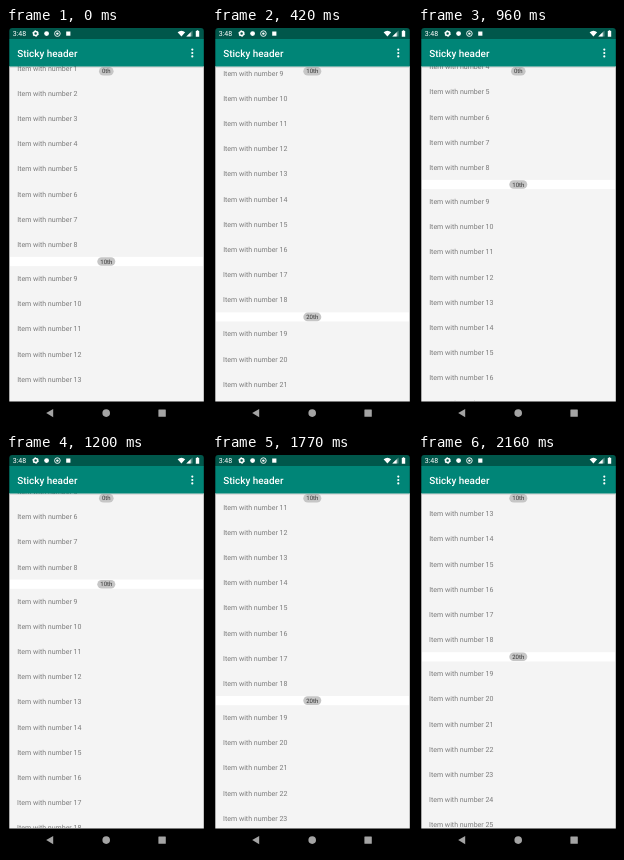
Recreate the animation shown at these times as an HTML page. Size 200x399 px, loop 3.39 s.

```html
<!DOCTYPE html>
<html lang="en">
<head>
<meta charset="utf-8">
<title>Sticky header</title>
<style>
  html, body { margin: 0; width: 100%; height: 100%; overflow: hidden; background: #000; }
  svg { display: block; width: 100vw; height: 100vh; }
  /* The tiny turn lets glyphs sit between whole pixels. */
  text { font-family: Roboto, sans-serif; text-rendering: geometricPrecision; transform: rotate(.02deg); }
  .item { font-size: 7.03px; fill: #7b7b7b; }
  .pill rect { fill: #c6c6c6; }
  .pill text { font-size: 6px; fill: #333; text-anchor: middle; }
</style>
</head>
<body>
<svg viewBox="0 0 200 399">
  <defs>
    <clipPath id="view"><rect x="3" y="38" width="195" height="335.5"/></clipPath>
    <linearGradient id="shade" x2="0" y2="1">
      <stop offset="0" stop-opacity=".18"/>
      <stop offset="1" stop-opacity="0"/>
    </linearGradient>
  </defs>
  <rect width="200" height="399"/>
  <rect x="3.3" y="38" width="194.5" height="335.5" fill="#f4f4f4"/>
  <g clip-path="url(#view)">
    <g id="list"></g>
    <g id="sticky"></g>
    <rect x="4" y="38.5" width="193" height="2" fill="url(#shade)"/>
  </g>

  <path d="M3.3 11.2V3Q3.3 0 6.3 0H194.8Q197.8 0 197.8 3V11.2Z" fill="#00574b"/>
  <rect x="3.3" y="11" width="194.5" height="27.5" fill="#008577"/>
  <text x="11.2" y="28.5" font-size="9.95" font-weight="500" fill="#fff">Sticky header</text>
  <g fill="#fff">
    <circle cx="186.3" cy="21.6" r="1.1"/>
    <circle cx="186.3" cy="25" r="1.1"/>
    <circle cx="186.3" cy="28.4" r="1.1"/>
    <text x="6.7" y="8" font-size="7">3:48</text>
    <circle cx="29.6" cy="5.6" r="2" fill="none" stroke="#fff" stroke-width="1.5"/>
    <circle cx="29.6" cy="5.6" r="2.9" fill="none" stroke="#fff" stroke-width=".8" stroke-dasharray="1.5 1.537"/>
    <circle cx="40.6" cy="5.6" r="2.4"/>
    <circle cx="51.4" cy="5.6" r="2.8" fill="none" stroke="#fff" stroke-width=".9"/>
    <circle cx="51.4" cy="5.6" r="1.2"/>
    <rect x="60.2" y="3.5" width="4.2" height="4.2"/>
    <path d="M171.6 4.2Q175.4 1.2 179.2 4.2L175.4 8.6Z"/>
    <path d="M186.5 2.4V8.6H180.3Z" fill-opacity=".35"/>
    <path d="M184.7 4.2V8.6H180.3Z"/>
    <path d="M189.8 3H190.7V2.3H192.3V3H193.2V8.8H189.8Z"/>
  </g>
  <g fill="#a4a4a4">
    <path d="M40.2 385.1L47.2 381V389.2Z"/>
    <circle cx="100.2" cy="385.1" r="3.8"/>
    <rect x="152.4" y="381.4" width="7.4" height="7.4" rx=".5"/>
  </g>
</svg>
<script>
const LOOP = 3390, STEP = 30;
const ROW = 25.2, HEAD = 8.8, GROUP = 10 * ROW + HEAD;
const TOP = 43.2;

// [time, y of item 9, ease-out power of the move that ends here]
const KEYS = [
  [0, 250.5, 1], [600, 13.8, 1.68], [630, 13.8, 1],
  [1050, 181.2, 2], [1080, 181.2, 1], [1530, 84, 1.44],
  [1650, 84, 1], [1770, 1.8, 1], [2160, -42, 2.2]
];

const list = document.getElementById('list');
const sticky = document.getElementById('sticky');

function add(parent, tag, attrs, label) {
  const el = document.createElementNS('http://www.w3.org/2000/svg', tag);
  for (const key in attrs) el.setAttribute(key, attrs[key]);
  if (label) el.textContent = label;
  parent.append(el);
  return el;
}

function pill(parent, k, y) {
  const w = k ? 18 : 14.6;
  const g = add(parent, 'g', { class: 'pill' });
  add(g, 'rect', { x: 100.3 - w / 2, y: y - 4.3, width: w, height: 8.6, rx: 4.3 });
  add(g, 'text', { x: 100.3, y: y + 2.1 }, k * 10 + 'th');
  return g;
}

// Offsets inside the list are measured from item 9.
const headY = k => (k - 1) * GROUP - 17;

for (let i = 0; i < 29; i++) {
  const y = (i - 9) * ROW + Math.floor((i - 9) / 10) * HEAD;
  add(list, 'text', { class: 'item', x: 11.2, y: y + 2.4 }, 'Item with number ' + i);
}
for (const k of [1, 2]) {
  add(list, 'rect', { x: 4, y: headY(k) - 4.6, width: 193, height: 9.2, fill: '#fff' });
  pill(list, k, headY(k));
}
const pins = [0, 1, 2].map(k => pill(sticky, k, 0));

function scrollAt(t) {
  const n = KEYS.findIndex(key => key[0] > t);
  if (n < 0) return KEYS[KEYS.length - 1][1];
  const [t0, y0] = KEYS[n - 1], [t1, y1, power] = KEYS[n];
  return y1 + (y0 - y1) * Math.pow((t1 - t) / (t1 - t0), power);
}

function render(t) {
  const y = scrollAt(t);
  list.setAttribute('transform', `translate(0 ${y})`);
  let now = 0;
  while (now < 2 && y + headY(now + 1) <= TOP) now++;
  const pinY = Math.min(TOP, y + headY(now + 1) - HEAD);
  sticky.setAttribute('transform', `translate(0 ${pinY})`);
  pins.forEach((pin, k) => pin.setAttribute('visibility', k === now ? 'visible' : 'hidden'));
}

const start = performance.now();
function tick() {
  const t = (performance.now() - start) % LOOP;
  render(Math.floor(t / STEP) * STEP);
  requestAnimationFrame(tick);
}
tick();
</script>
</body>
</html>
```
